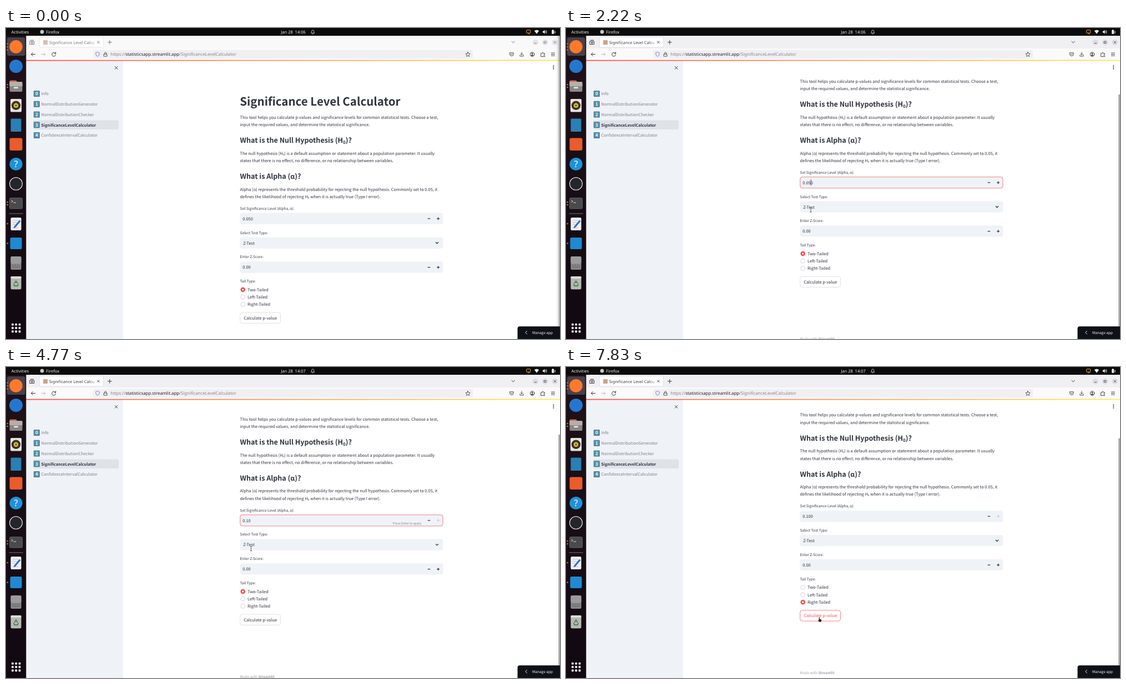
An HTML page for the animation above (7990 ms loop, 998 px wide and 561 px high).

```html
<!DOCTYPE html>
<html lang="en">
<head>
<meta charset="utf-8">
<title>Significance Level Calculator</title>
<style>
html, body { margin: 0; width: 100%; height: 100%; overflow: hidden; background: #fff; }
svg { display: block; }
text { white-space: pre; text-rendering: geometricPrecision; }
.page text { font: 7.45px "Noto Sans CJK JP", "Noto Sans CJK SC", "Noto Sans", sans-serif; fill: #31333f; }
.page .h1 { font-size: 20.5px; font-weight: 700; }
.page .h3 { font-size: 12.55px; font-weight: 600; }
.page .label { font-size: 6.52px; }
.page .hint { font-size: 5.6px; fill: #83858c; }
.page .foot { font-size: 6.52px; fill: #a3a4ab; }
.page .foot tspan { font-size: 6.36px; font-weight: 700; }
.page .nav { fill: #7f828b; }
.page .on { font-size: 7.26px; font-weight: 700; fill: #31333f; }
.page .digit { font-size: 8px; font-weight: 700; fill: #fff; text-anchor: middle; }
.page .manage { font-size: 6.52px; fill: #fff; }
.greek { font-family: "Noto Sans", sans-serif; font-size: .98em; }
.sub { font-size: .64em; }
.ui text { font: 7.6px "Noto Sans", "Open Sans", sans-serif; }
.bar text { fill: #f0f0f0; font-weight: 500; }
.line { fill: none; stroke: #2f3036; stroke-width: .95; stroke-linecap: round; stroke-linejoin: round; }
.box { fill: #eff2f6; }
.ring { fill: #fff; stroke: #bfc2c8; stroke-width: .7; }
.bold { fill: none; stroke: #31333f; stroke-width: 1.25; }
</style>
</head>
<body>
<svg width="998" height="561" viewBox="0 0 998 561">
<defs>
  <linearGradient id="deco"><stop stop-color="#ff4b4b"/><stop offset="1" stop-color="#fdea5c"/></linearGradient>
  <linearGradient id="dockBg" x2="0" y2="1"><stop stop-color="#1f1119"/><stop offset=".55" stop-color="#170d15"/><stop offset="1" stop-color="#120811"/></linearGradient>
  <linearGradient id="fade" gradientUnits="userSpaceOnUse" x1="150" x2="163"><stop stop-color="#3f4047"/><stop offset="1" stop-color="#3f4047" stop-opacity=".2"/></linearGradient>
  <linearGradient id="edge"><stop stop-opacity="0"/><stop offset=".5" stop-opacity=".1"/><stop offset="1" stop-opacity=".42"/></linearGradient>
  <clipPath id="main"><rect x="211" y="59" width="787" height="502"/></clipPath>
  <path id="beam" d="M-1.800-4.400Q0-4.400 0-3.300V3.300Q0 4.400 1.800 4.400M1.800-4.400Q0-4.400 0-3.300M0 3.300Q0 4.400-1.800 4.400" fill="none"/>
</defs>

<g class="page">
  <rect x="211" y="58" width="787" height="503" fill="#fff"/>
  <g clip-path="url(#main)">
    <g id="content">
      <text class="h1" x="421.3" y="140.1">Significance Level Calculator</text>
      <text x="421.5" y="163.6">This tool helps you calculate p-values and significance levels for common statistical tests. Choose a test,</text>
      <text x="421.5" y="177">input the required values, and determine the statistical significance.</text>
      <text class="h3" x="421.5" y="207.1">What is the Null Hypothesis (H<tspan class="sub" dy="2">0</tspan><tspan dy="-2">)?</tspan></text>
      <text x="421.5" y="228.6">The null hypothesis (H<tspan class="sub" dy="1.1">0</tspan><tspan dy="-1.1">) is a default assumption or statement about a population parameter. It usually</tspan></text>
      <text x="421.5" y="242">states that there is no effect, no difference, or no relationship between variables.</text>
      <text class="h3" x="421.5" y="272.1">What is Alpha (<tspan class="greek">α</tspan>)?</text>
      <text x="421.5" y="293.5">Alpha (<tspan class="greek">α</tspan>) represents the threshold probability for rejecting the null hypothesis. Commonly set to 0.05, it</text>
      <text x="421.5" y="306.8">defines the likelihood of rejecting H<tspan class="sub" dy="1.1">0</tspan><tspan dy="-1.1"> when it is actually true (Type I error).</tspan></text>

      <text class="label" x="421.5" y="327.7">Set Significance Level (Alpha, <tspan class="greek">α</tspan>):</text>
      <rect class="box" x="421.5" y="333.6" width="365.8" height="20.3" rx="4"/>
      <rect id="focus" x="421.8" y="333.7" width="365.2" height="20.2" rx="4" fill="none" stroke="#f0555a" stroke-width=".7"/>
      <text id="alpha" x="426.2" y="346.6"></text>
      <rect id="caret" y="338" width=".8" height="11.4" fill="#22242e"/>
      <text id="hint" class="hint" x="696.7" y="351">Press Enter to apply</text>
      <path id="minus" class="bold" d="M759.6 343.8h4.6"/>
      <path id="plus" class="bold" d="M776.2 343.8h4.8m-2.4-2.4v4.8"/>

      <text class="label" x="421.5" y="371.5">Select Test Type:</text>
      <rect class="box" x="421.5" y="377.4" width="365.8" height="20.3" rx="4"/>
      <text x="427.2" y="390.5">Z-Test</text>
      <path class="bold" d="M773.9 386.2l2.6 2.6 2.6-2.6"/>

      <text class="label" x="421.5" y="415.3">Enter Z-Score:</text>
      <rect class="box" x="421.5" y="421.2" width="365.8" height="20.3" rx="4"/>
      <text x="426.2" y="434.3">0.00</text>
      <path class="bold" d="M759.6 431.6h4.6M776.2 431.6h4.8m-2.4-2.4v4.8"/>

      <text class="label" x="421.5" y="459.3">Tail Type:</text>
      <g id="radios"></g>
      <rect id="btn" x="421.7" y="513.2" width="72.8" height="19.4" rx="4" fill="#fff" stroke-width=".7"/>
      <text id="btnText" x="428.2" y="525.7">Calculate p-value</text>
      <text class="foot" x="421.5" y="628">Made with <tspan>Streamlit</tspan></text>
    </g>
    <rect id="thumb" x="995.6" width="1.9" height="431" rx=".9" fill="#85868a"/>
    <rect x="211" y="59" width="787" height="23.5" fill="#fff"/>
    <g fill="#31333f"><circle cx="986.3" cy="68.2" r=".95"/><circle cx="986.3" cy="71" r=".95"/><circle cx="986.3" cy="73.8" r=".95"/></g>
  </g>

  <rect x="36" y="58" width="175" height="503" class="box"/>
  <path class="line" d="M196.2 69.4l4.8 4.8m0-4.8l-4.8 4.8"/>
  <rect x="49" y="166.5" width="154" height="16.4" rx="2" fill="#dfe3e8"/>
  <g id="nav"></g>

  <path d="M921.5 561V542.3q0-4 4-4H998V561Z" fill="#0e1117"/>
  <path d="M938.4 546.6l-2.6 2.7 2.6 2.7" class="line" style="stroke:#fff"/>
  <text class="manage" x="948" y="551.7">Manage app</text>
</g>

<g class="ui">
  <rect id="strip" x="36" y="14" width="962" height="24"/>
  <g id="tabs">
    <rect x="60.3" y="16.3" width="115.5" height="18.6" rx="2.2" fill="#fff" stroke="#d5d5da" stroke-width=".7"/>
    <rect x="67" y="22" width="8" height="8" rx=".8" fill="#c9a48c"/>
    <text x="77.8" y="28.6" style="font-size:7.4px" fill="url(#fade)">Significance Level Calcu</text>
    <path class="line" stroke-width=".7" d="M164.5 23.8l3.6 3.6m0-3.6l-3.6 3.6M183.5 25.7h6.6m-3.3-3.3v6.6M911 24.2l2.7 2.6 2.7-2.6M43.2 24h7.4v5.4h-7.4zM44.2 22h5.4M46.9 25.2v3m-1.5-1.5h3"/>
    <g fill="#dedee2"><circle cx="953.8" cy="25.8" r="5.4"/><circle cx="971.2" cy="25.8" r="5.4"/><circle cx="988.8" cy="25.8" r="5.4"/></g>
    <path class="line" style="stroke-width:.8" d="M952 27.4h3.6M969.6 24.2h3.2v3.2h-3.2zM987.2 24.2l3.2 3.2m0-3.2l-3.2 3.2"/>
  </g>
  <rect x="36" y="37" width="962" height="21" fill="#fafafb"/>
  <rect x="157" y="39.8" width="684" height="15.4" rx="2.2" fill="#f0f0f3"/>
  <text x="188.3" y="50.2" style="font-size:7.84px" fill="#85858b">https://<tspan fill="#222329">statisticsapp.streamlit.app</tspan>/SignificanceLevelCalculator</text>
  <path class="line" d="M52.6 47.5h-7.2m3-3l-3 3 3 3"/>
  <path class="line" style="stroke:#b9b9be" d="M63.6 47.5h7.2m-3-3l3 3-3 3"/>
  <path class="line" d="M89.2 45.8a3.5 3.5 0 1 0 .4 2.6M89.6 43.6v2.5h-2.5"/>
  <path class="line" style="stroke:#5f62c8;stroke-width:.8" d="M165 43.6l3.2 1.1v2.5q-.3 2.8-3.2 4.2-2.9-1.4-3.2-4.2v-2.5z"/>
  <path class="line" style="stroke-width:.8" d="M176.4 47h5.6v4h-5.6zM177.6 47v-1.5a1.6 1.6 0 0 1 3.2 0v1.5"/>
  <path class="line" style="stroke-width:.8" d="M832 43.5l1.2 2.6 2.8.4-2 2 .5 2.8-2.500-1.400-2.500 1.400.5-2.800-2-2 2.800-.4z"/>
  <path class="line" style="stroke-width:.85" d="M907.6 44.7h6.6v2.5a3.3 3.3 0 0 1-6.6 0zM909.3 46.7l1.6 1.5 1.6-1.5M929 43.8v4.7m-2-2l2 2 2-2M925.9 48.7v2.2h6.2v-2.2M964 45.8h2v-1q1-1.6 2 0v1h2.3v2h-1q-1.500 1 0 2h1v1.700h-6.300zM982.400 45h6M982.400 47.500h6M982.400 50h6"/>
  <circle cx="948" cy="47.5" r="3.7" class="line"/><circle cx="948" cy="46.5" r="1.3" fill="#2f3036"/><path d="M945.6 49.6q2.4-2.2 4.8 0l-2.4 1.3z" fill="#2f3036"/>
  <rect x="36" y="57.7" width="962" height="1.7" fill="url(#deco)"/>
  <rect id="shade" x="991" y="14" width="7" height="524.5" fill="url(#edge)"/>

  <g class="bar">
    <rect width="998" height="14" fill="#0c0c0c"/>
    <text x="9.5" y="9.7">Activities</text>
    <circle cx="65" cy="6.9" r="3.4" fill="#c8c8c8"/>
    <text x="72" y="9.7">Firefox</text>
    <text id="clock" x="495.3" y="9.7" style="font-size:7.5px"></text>
    <path class="line" style="stroke:#e6e6e6;stroke-width:.8" d="M549.7 8.8q1-.8 1-3a2 2 0 0 1 4 0q0 2.2 1 3zM552 10.7h1.4"/>
    <rect x="937.6" y="3.7" width="7.2" height="5.2" rx=".8" fill="none" stroke="#e8a23c"/><path d="M940 10.4h3.6" stroke="#e8a23c"/>
    <path d="M951.8 5.1q4.2-3.2 8.4 0L956 10.4z" fill="#eee"/>
    <path d="M966.9 5.6h1.6l2.2-2v7l-2.2-2h-1.6z" fill="#eee"/><path class="line" style="stroke:#eee;stroke-width:.8" d="M972 5.3q1.1 1.7 0 3.4M973.4 4.2q2 2.8 0 5.6"/>
    <path d="M983.2 4h1v-1h2v1h1v6.8h-4zM988.4 5.4h1.2v4h-1.2z" fill="#eee"/>
  </g>

  <rect y="14" width="36.3" height="547" fill="url(#dockBg)"/>
  <rect x="2" y="17" width="32.5" height="33" rx="3" fill="#4b4049"/>
  <g id="dots" fill="#e9683b"></g>
  <circle cx="18" cy="33.8" r="11.8" fill="#ff7a2d"/>
  <circle cx="18" cy="69" r="12" fill="#2477cf"/>
  <rect x="6.5" y="94.5" width="13" height="10" rx="2" fill="#d9694b"/><rect x="6.5" y="97" width="23" height="18" rx="2" fill="#8b8784"/><path d="M6.5 105h23v-6q0-2-2-2h-21z" fill="#b4b0ad"/><rect x="14" y="106.5" width="8" height="2.5" rx="1" fill="#eee"/>
  <rect x="8" y="128" width="20" height="23.5" rx="2" fill="#e7e5e0"/><circle cx="18" cy="139.8" r="8.2" fill="#343434"/><circle cx="18" cy="139.8" r="4.3" fill="#f2b81e"/><circle cx="18" cy="139.8" r="1.5" fill="#343434"/>
  <rect x="8.5" y="163.5" width="19" height="23.5" rx="1.5" fill="#2a7fb5"/>
  <rect x="6.5" y="198.5" width="23" height="22.5" rx="3" fill="#ea5b2d"/>
  <circle cx="18" cy="245.5" r="11.6" fill="#2092d8"/><text x="18" y="251.3" fill="#fff" text-anchor="middle" style="font-size:16px">?</text>
  <circle cx="18" cy="281" r="11.4" fill="#26262a" stroke="#dcdcdc" stroke-width="1.3"/>
  <rect x="6.5" y="306.5" width="23" height="19.5" rx="2" fill="#4a4a4c" stroke="#727274" stroke-width=".7"/><path class="line" style="stroke:#f2f2f2" d="M10 311l2.2 1.7-2.2 1.7M14 315h3.5"/>
  <path d="M5.5 334.8h25" stroke="#8a8088" stroke-width=".9"/>
  <rect x="8.5" y="342" width="19" height="23" rx="2" fill="#f1f1f1"/><path d="M11.5 347h10M11.5 350.5h8M11.5 354h5M11.5 360h11" stroke="#b9bcc2" stroke-width=".9"/><path d="M14.5 358l9.5-11.5 2.5 2-9.5 11.5-3.2 1.2z" fill="#2c6fd0"/>
  <rect x="7.5" y="378" width="21" height="21" rx="2.5" fill="#1f8ad2"/>
  <rect x="8.5" y="412" width="19" height="24" rx="2.5" fill="#8a898b"/><rect x="8.5" y="412" width="19" height="13" rx="2.5" fill="#9b9a9c"/><text x="18" y="433" fill="#5b5a5d" text-anchor="middle" style="font-size:8.2px">SSD</text>
  <rect x="8.5" y="448" width="19" height="23.5" rx="2.5" fill="#b9b8b6"/><rect x="8.5" y="448" width="19" height="4" rx="1.5" fill="#dddcda"/><path d="M15 461l3-4.6 3 4.6M22.5 462l-2 3.3h-5l-2-3.3" fill="none" stroke="#3a8c4a" stroke-width="1.9"/>
  <g id="grid" fill="#f2f2f2"></g>
</g>

<g id="cursor" stroke-linejoin="round">
  <path id="arrow" d="M0 0V7.6L1.8 6 3 8.7 4.3 8.1 3.1 5.5 5.5 5.3Z" fill="#1b1b1b" stroke="#fff" stroke-width=".5"/>
  <g id="ibeam"><use href="#beam" stroke="#fff" stroke-width="1.4" opacity=".7"/><use href="#beam" stroke="#2a2a2a" stroke-width=".75"/></g>
  <path id="hand" d="M-.9.5Q0-.5.9.5V3.6L3.2 4.1Q4.3 4.4 4.1 5.6L3.6 8.9H-.4L-2.5 5.9Q-2.1 4.7-.9 5.5Z" fill="#1b1b1b" stroke="#fff" stroke-width=".5"/>
</g>
</svg>

<script>
const LOOP = 7990, CLICK = 1860, BLUR = 6520;
const $ = id => document.getElementById(id);
const set = (id, name, value) => $(id).setAttribute(name, value);
const show = (id, on) => set(id, 'opacity', +on);

const pages = ['Info', 'NormalDistributionGenerator', 'NormalDistributionChecker',
  'SignificanceLevelCalculator', 'ConfidenceIntervalCalculator'];
$('nav').innerHTML = pages.map((name, i) => {
  const y = 118.5 + i * 18.75;
  return `<rect x="49.8" y="${y - 5.5}" width="11" height="11" rx="1.2" fill="#427687"/>
    <rect x="50.3" y="${y - 5}" width="10" height="9.6" rx="1" fill="#5590a8"/>
    <text class="digit" x="55.3" y="${y + 2.9}">${i}</text>
    <text class="nav ${i === 3 ? 'on' : ''}" x="63.3" y="${y + 2.9}">${name}</text>`;
}).join('');

$('radios').innerHTML = ['Two', 'Left', 'Right'].map((side, i) => {
  const y = 472 + i * 13.3;
  return `<circle id="ring${i}" class="ring" cx="426.7" cy="${y}" r="3.9"/>
    <g id="mark${i}"><circle cx="426.7" cy="${y}" r="4.2" fill="#ff4b4b"/><circle cx="426.7" cy="${y}" r="1.6" fill="#fff"/></g>
    <text x="435" y="${y + 2.8}">${side}-Tailed</text>`;
}).join('');

$('dots').innerHTML = [28.5, 34, 39.5, 102, 107, 314, 319, 353, 388.5]
  .map(y => `<circle cx="2.8" cy="${y}" r="1.3"/>`).join('');
$('grid').innerHTML = Array.from({ length: 9 }, (_, i) =>
  `<rect x="${10 + i % 3 * 6.3}" y="${533 + Math.floor(i / 3) * 6.3}" width="3.8" height="3.8" rx="1"/>`).join('');

// Each row: time, then values reached at that time
const scroll = [[880, 0], [970, 1], [1040, 38], [1120, 65], [4700, 65], [4770, 67], [4850, 72], [4920, 74.4]];
const thumb = [[110, 0], [260, 1], [3200, 1], [3460, 0], [4690, 0], [4770, 1]];
const mouse = [
  [110, 985, 300], [350, 640, 330], [600, 404, 345], [880, 472, 328], [970, 496, 320],
  [1120, 468, 323], [1250, 466, 322], [1760, 444, 280], [1900, 443, 279], [2220, 441, 328],
  [4770, 441.5, 327], [4920, 444, 410], [5080, 446, 427], [5480, 447.5, 427.5], [5720, 447.5, 421],
  [5960, 448, 417.5], [6040, 449.5, 418.5], [6200, 452, 418], [6360, 452.5, 421], [6520, 452, 418.5],
  [7330, 452, 419], [7500, 451, 451], [7720, 451, 451], [7830, 456.3, 451]];
const carets = [[CLICK, 3380], [4030, 4360], [4850, 5160], [5480, 5720]];

function at(track, t) {
  const i = track.findIndex(row => row[0] > t);
  if (i === 0) return track[0].slice(1);
  if (i < 0) return track[track.length - 1].slice(1);
  const a = track[i - 1], b = track[i], k = (t - a[0]) / (b[0] - a[0]);
  return a.slice(1).map((v, n) => v + (b[n + 1] - v) * k);
}

function draw(t) {
  const [s] = at(scroll, t);
  set('content', 'transform', `translate(0 ${-s})`);
  set('thumb', 'y', 60 + s * .92);
  show('thumb', at(thumb, t)[0]);

  const active = t >= CLICK;
  set('strip', 'fill', active ? '#f0f0f3' : '#f9f9fa');
  set('tabs', 'opacity', active ? 1 : .68);
  show('shade', !active);
  $('clock').textContent = t < 3300 ? 'Jan 28  14:06' : 'Jan 28  14:07';

  const [value, before] = t < 2810 ? ['0.050', 14.5] : t < 3050 ? ['0.00', 10.3]
    : t < 4030 ? ['0.0', 6.2] : t < BLUR ? ['0.10', 10.3] : ['0.100', 0];
  $('alpha').textContent = value;
  set('caret', 'x', 426.2 + before);
  show('caret', carets.some(([a, b]) => t >= a && t < b));
  show('focus', active && t < BLUR);
  show('hint', t >= 2810 && t < BLUR);
  set('minus', 'opacity', t >= 2810 && t < 4030 ? .2 : 1);
  set('plus', 'opacity', t >= 4030 ? .2 : 1);

  const picked = t < BLUR ? 0 : 2;
  for (let i = 0; i < 3; i++) show('mark' + i, i === picked);
  $('ring2').style.fill = t >= 5000 && t < BLUR ? '#e6e8ec' : '#fff';
  const hot = t >= 7400;
  set('btn', 'stroke', hot ? '#ff4b4b' : '#d3d4d9');
  $('btnText').style.fill = hot ? '#ff4b4b' : '#31333f';

  const [x, y] = at(mouse, t);
  set('cursor', 'transform', `translate(${x} ${y})`);
  show('cursor', t >= 110 && (t < 2850 || t >= 4600));
  show('arrow', t < 1040);
  show('ibeam', t >= 1040 && t < 4900);
  show('hand', t >= 4900);
}

function tick() {
  draw(performance.now() % LOOP);
  requestAnimationFrame(tick);
}
tick();
</script>
</body>
</html>
```
